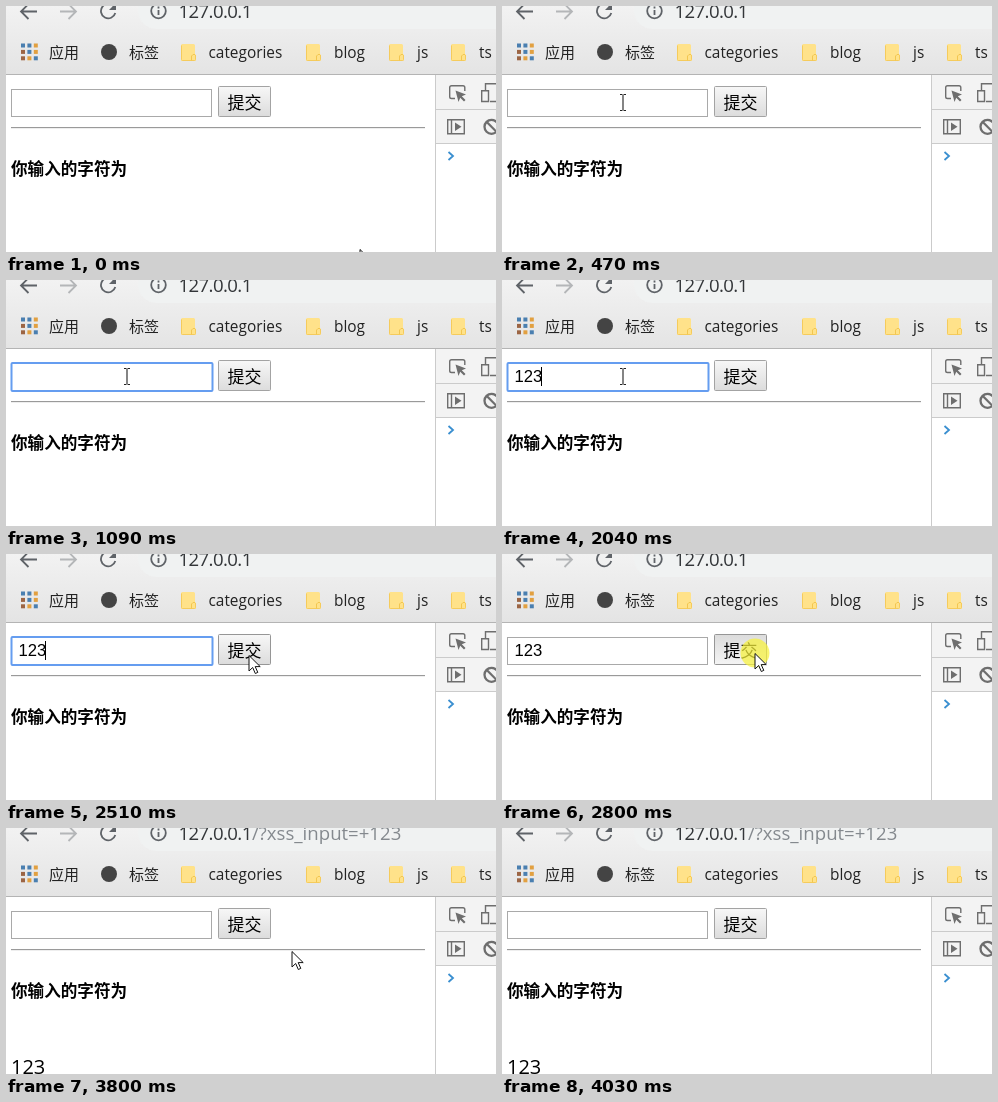
Write an HTML page that moves like this. It is 490 px wide and 246 px high and loops after 4.49 s.

```html
<!DOCTYPE html>
<html lang="zh">
<head>
<meta charset="utf-8">
<title>Form demo</title>
<style>
html, body { margin: 0; width: 100%; height: 100%; overflow: hidden; background: #fff; }
svg { display: block; width: 490px; height: 246px; }
.bar { font: 15.4px "Open Sans", "Noto Sans CJK SC", "Noto Sans CJK", sans-serif; fill: #222; }
.zh { font-family: "Noto Sans CJK SC", "Noto Sans CJK", sans-serif; }
.url { font: 18.6px "Open Sans", sans-serif; }
.icon { fill: none; stroke: #5f6368; stroke-width: 1.8; }
.tool { fill: none; stroke: #6e6e6e; stroke-width: 1.4; }
.bold { stroke-width: 2.3; }
</style>
</head>
<body>
<svg viewBox="0 0 490 246">
  <defs>
    <linearGradient id="chrome" x2="0" y2="1"><stop stop-color="#f2f2f2"/><stop offset="1" stop-color="#e4e4e4"/></linearGradient>
    <linearGradient id="up" x2="0" y2="1"><stop stop-color="#f7f7f7"/><stop offset="1" stop-color="#dcdcdc"/></linearGradient>
    <linearGradient id="down" x2="0" y2="1"><stop stop-color="#dcdcdc"/><stop offset="1" stop-color="#f4f4f4"/></linearGradient>
    <g id="folder">
      <path d="M0 1.5q0-1.5 1.5-1.5h11q1.5 0 1.5 1.5v8.5l1 1v4.5q0 1.5-1.5 1.5h-12q-1.5 0-1.5-1.5z" fill="#ffe28a"/>
      <path d="M.5 1.5v14q0 1 1 1h12q1 0 1-1v-4.5" fill="none" stroke="#f5cb5c"/>
      <path d="M10.5 16.5v-4.500l1.5-1.5h2" fill="none" stroke="#f2c650"/>
    </g>
  </defs>

  <!-- browser toolbar -->
  <rect width="490" height="68" fill="url(#chrome)"/>
  <rect x="132" y="-14" width="400" height="37" rx="18.5" fill="#f0f2f2"/>
  <rect y="68" width="490" height="1" fill="#b4b4b4"/>
  <path class="icon" d="M31 5.500H15.500M22.500-2L15 5.500 22.500 13"/>
  <path class="icon" style="stroke:#b4b6b8" d="M54 5.500H69.500M62.500-2L70 5.500 62.500 13"/>
  <path class="icon" d="M108 .5A7.300 7.300 0 1 0 109.300 7"/>
  <path d="M110-3V4H103z" fill="#5f6368"/>
  <circle class="icon" cx="152.500" cy="5" r="7.300"/>
  <path class="icon" d="M152.500 4v5M152.500 .5v2"/>
  <text class="url" x="172.500" y="12" fill="#333639" letter-spacing="-.6">127.0.0.1</text>
  <text id="query" class="url" x="246" y="12" fill="#84898e">/?xss_input=+123</text>

  <!-- bookmarks -->
  <g id="apps"></g>
  <circle cx="103" cy="46" r="8" fill="#444"/>
  <g id="folders"></g>
  <g class="bar">
    <g class="zh" font-size="15"><text x="43" y="52">应用</text><text x="123" y="52">标签</text></g>
    <text x="202.500" y="52">categories</text>
    <text x="328" y="52">blog</text>
    <text x="411" y="52">js</text>
    <text x="473" y="52">ts</text>
  </g>

  <!-- page -->
  <rect id="field" fill="#fff"/>
  <text id="typed" x="12.500" y="102" font-family="Liberation Sans, Arial, sans-serif" font-size="16.670"></text>
  <rect id="caret" y="87" width="1" height="19"/>
  <rect id="button" x="212.500" y="80.500" width="52" height="30" rx="1"/>
  <text class="zh" x="221.500" y="102.500" font-size="17">提交</text>
  <path d="M5 121.500H419" stroke="#9a9a9a"/>
  <path d="M5 122.500H419" stroke="#eee"/>
  <text class="zh" x="5" y="169" font-size="16.600" font-weight="700">你输入的字符为</text>
  <text id="result" x="5" y="246" font-family="Open Sans, sans-serif" font-size="20">123</text>

  <!-- developer tools -->
  <rect x="429" y="69" width="61" height="177" fill="#fff"/>
  <rect x="430" y="69" width="60" height="68" fill="#f3f3f3"/>
  <path d="M429.500 69V246M430 103.500H490M430 137.500H490" stroke="#cbcbcb"/>
  <path class="tool" d="M449 92.500H445.500q-1.800 0-1.800-1.800V81.500q0-1.800 1.800-1.800H457q1.800 0 1.800 1.800V85"/>
  <path d="M449.500 84.500L460 88.500 455.800 90.200 459.500 94 458 95.500 454.200 91.800 452.500 96z" fill="#6e6e6e"/>
  <path class="tool" d="M479.500 84V77.700H492M484 95.500H492M475.700 84.700H482.500V95.500H475.700z"/>
  <path class="tool" d="M441.700 113.700H458.300V127.800H441.700zM445.500 113.700V127.800"/>
  <path d="M449 116.500V125L455.500 120.700z" fill="#6e6e6e"/>
  <circle class="tool bold" cx="485.500" cy="120.800" r="7"/>
  <path class="tool bold" d="M480.500 115.800L490.500 125.800"/>
  <path d="M442.500 146L447 150 442.500 154" fill="none" stroke="#3a8fd0" stroke-width="1.800"/>

  <!-- pointer -->
  <circle id="halo" r="14.500" fill="#f6f13c" fill-opacity=".72"/>
  <path id="arrow" d="M0 .5V16L3.700 12.500 6.300 18.500 8.800 17.400 6.200 11.600H11.200z" fill="#fff" stroke="#111"/>
  <path id="beam" d="M-2 -7.500H.5M1.500 -7.500H4M1-7V8M-2 8.500H.5M1.500 8.500H4" fill="none" stroke="#222" stroke-width="1.100"/>
</svg>
<script>
const LOOP = 4490;
const $ = id => document.getElementById(id);
const set = (el, attrs) => { for (const k in attrs) el.setAttribute(k, attrs[k]); };
const show = (el, on) => el.setAttribute("visibility", on ? "visible" : "hidden");
const between = (t, a, b) => t >= a && t < b;
const el = Object.fromEntries(
  ["query", "field", "typed", "caret", "button", "result", "halo", "arrow", "beam"].map(id => [id, $(id)]));

const blue = "#4a7fb0", amber = "#e2a040", brown = "#9c6544";
const tints = [blue, blue, amber, brown, blue, amber, brown, amber, blue];
$("apps").innerHTML = tints.map((c, i) =>
  `<rect x="${15 + i % 3 * 6.4}" y="${37.5 + Math.floor(i / 3) * 6.4}" width="4" height="4" fill="${c}"/>`).join("");
$("folders").innerHTML = [175, 300, 383, 445].map(x => `<use href="#folder" x="${x}" y="38"/>`).join("");

const START = [354, 243], INPUT = [120, 96], SUBMIT = [253, 99], EXIT = [407, 213];

// Pointer moves are sampled at a fixed number of ticks, as a screen recorder does.
const moves = [
  { from: START, to: INPUT, t0: 70, t1: 470, ticks: 6, ease: p => 1 - (1 - p) ** 1.5, dip: 0 },
  { from: INPUT, to: SUBMIT, t0: 2190, t1: 2570, ticks: 6, ease: p => p * p * (3 - 2 * p), dip: 5 },
  { from: SUBMIT, to: EXIT, t0: 3800, t1: 3950, ticks: 3, ease: p => p ** 1.4, dip: 0 }
];

function pointerAt(t) {
  let pos = START;
  for (const m of moves) {
    if (t < m.t0) break;
    const step = (m.t1 - m.t0) / (m.ticks - 1);
    const tick = Math.min(m.ticks, Math.floor((t - m.t0) / step + 1e-6) + 1);
    const p = tick / m.ticks, e = m.ease(p);
    pos = [0, 1].map(i => m.from[i] + (m.to[i] - m.from[i]) * e);
    pos[1] += m.dip * Math.sin(Math.PI * p);
  }
  return pos.map(Math.round);
}

function draw(t) {
  const focused = between(t, 540, 2740);
  const count = t >= 3030 ? 0 : [1490, 1720, 2040].filter(k => t >= k).length;
  set(el.field, focused
    ? { x: 5.5, y: 83, width: 201, height: 28, rx: 1, stroke: "#659df0", "stroke-width": 2 }
    : { x: 5.5, y: 83.5, width: 200, height: 27, rx: 0, stroke: "#a9a9a9", "stroke-width": 1 });
  el.typed.textContent = "123".slice(0, count);
  set(el.caret, { x: 12 + 9 * count });
  show(el.caret, between(t, 540, 1090) || between(t, 1490, 2570));

  const pressed = between(t, 2740, 2970);
  const hover = between(t, 2490, 3800);
  set(el.button, { fill: `url(#${pressed ? "down" : "up"})`, stroke: hover ? "#969696" : "#a3a3a3" });
  show(el.query, t >= 2970);
  show(el.result, t >= 3030);

  const [x, y] = pointerAt(t);
  const inField = between(x, 5, 207) && between(y, 83, 111);
  const visible = t < 4030;
  for (const part of [el.halo, el.arrow, el.beam]) set(part, { transform: `translate(${x} ${y})` });
  show(el.beam, visible && inField);
  show(el.arrow, visible && !inField);
  show(el.halo, between(t, 540, 710) || between(t, 2800, 2970));
}

const begin = performance.now();
function frame() {
  draw((performance.now() - begin) % LOOP);
  requestAnimationFrame(frame);
}
draw(0);
requestAnimationFrame(frame);
</script>
</body>
</html>
```
